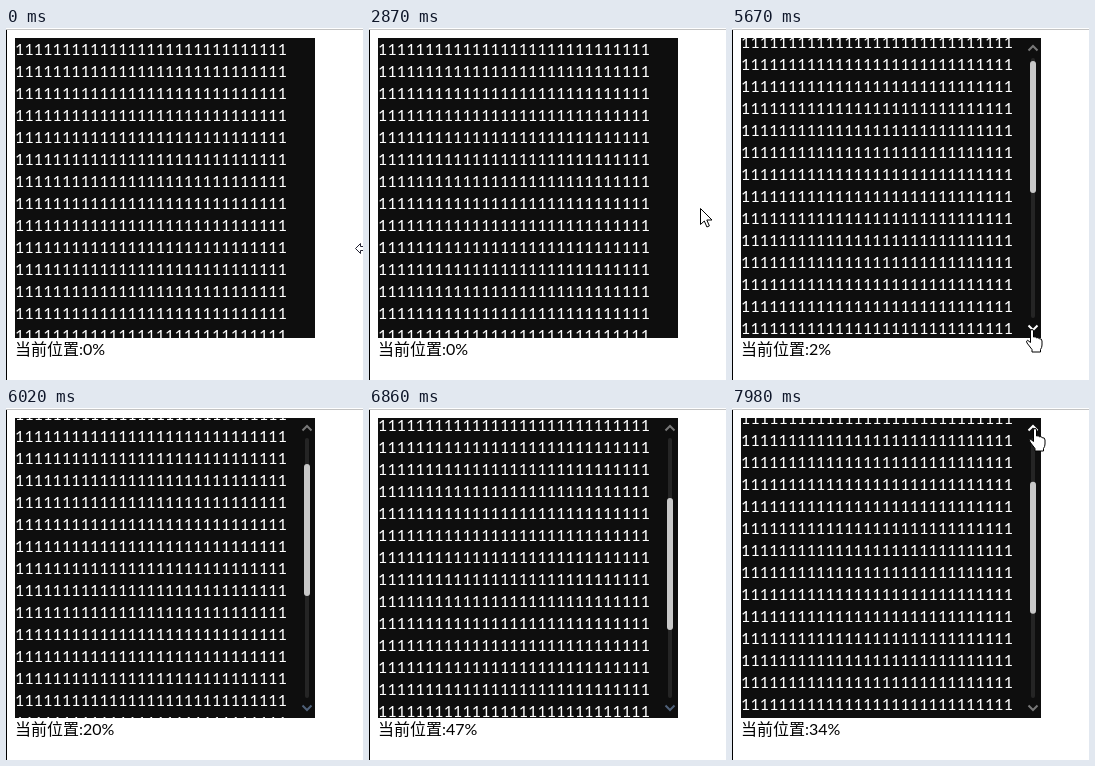
Recreate the animation shown at these times as an HTML page. Size 357 px wide and 352 px high, loop 8 s.

```html
<!DOCTYPE html>
<html lang="zh">
<head>
<meta charset="utf-8">
<title>Scroll position</title>
<style>
@property --scroll { syntax: "<integer>"; inherits: true; initial-value: 0; }
@property --percent { syntax: "<integer>"; inherits: true; initial-value: 0; }

html, body { margin: 0; width: 100%; height: 100%; overflow: hidden; background: #fff; }
body { position: relative; font: 16px/22px Lato, "Noto Sans CJK SC", "Noto Sans CJK", sans-serif; }
body * { animation: 8s linear infinite; }
.edge { position: absolute; background: #000; left: 0; top: 2px; width: 1px; bottom: 0; }
.edge.top { background: #c3c3c3; top: 1px; width: 100%; height: 1px; }

#demo { position: absolute; left: 9px; top: 10px; width: 300px; animation-name: scroll; }
#view { position: relative; height: 300px; overflow: hidden; background: #0e0e0e; color: #fff; }
#rows { white-space: pre; letter-spacing: .1px; transform: translateY(calc(var(--scroll) * -1px)); }
#status { color: #000; }
#status::after {
  --percent: calc(var(--scroll) / 2.9);
  counter-reset: percent var(--percent);
  content: counter(percent) "%";
}

#bar { position: absolute; inset: 0; animation-name: bar; }
#track, #thumb { position: absolute; top: 20px; border-radius: 3px; }
#track { left: 290px; width: 4px; height: 260px; background: #252525; }
#thumb {
  left: 289px; width: 6px; height: 132px; background: #c8c8c8;
  transform: translateY(calc(var(--scroll) * .4414px)); animation-name: thumb;
}
#bar svg { position: absolute; inset: 0; fill: none; stroke-width: 2; }
#up, #down { stroke: #777; animation-timing-function: step-end; }
#up { animation-name: up; }
#down { animation-name: down; }

#pointer { position: absolute; left: 0; top: 0; animation-name: move; }
#pointer svg { display: block; overflow: visible; width: 1px; height: 1px; }
#pointer path { fill: #fff; stroke: #000; visibility: hidden; animation-timing-function: step-end; }
#pointer #resize { stroke: #223; animation-name: resize; }
#pointer #arrow { animation-name: arrow; }
#pointer #beam { fill: none; stroke: #ddd; animation-name: beam; }
#pointer #hand { animation-name: hand; }

@keyframes scroll {
  0%, 69.6% { --scroll: 0; }
  70.8% { --scroll: 6; }
  79.6% { --scroll: 111; }
  85.7% { --scroll: 136; }
  88% { --scroll: 139; }
  93%, 100% { --scroll: 99; }
}
@keyframes bar {
  0%, 20.4% { opacity: 0; }
  22.5%, 33.5% { opacity: 1; }
  35.8%, 40.8% { opacity: 0; }
  43%, 100% { opacity: 1; }
}
@keyframes thumb {
  0%, 58% { background: #c8c8c8; }
  59%, 62% { background: #ddd; }
  63%, 100% { background: #c8c8c8; }
}
@keyframes up { 0% { stroke: #777; } 99.7%, 100% { stroke: #fff; } }
@keyframes down {
  0% { stroke: #777; }
  66% { stroke: #fff; }
  72% { stroke: #4f6078; }
  91%, 100% { stroke: #777; }
}
@keyframes move {
  0%, .8% { transform: translate(349px, 220px); }
  1% { transform: translate(347px, 206px); }
  7% { transform: translate(335px, 195px); }
  8.7%, 12.2% { transform: translate(334px, 194px); }
  14%, 19.2% { transform: translate(331px, 180px); }
  23.6%, 29.7% { transform: translate(262px, 172px); }
  35.8%, 40.2% { transform: translate(331px, 180px); }
  43.7%, 55.1% { transform: translate(234px, 169px); }
  59.4%, 60% { transform: translate(302px, 155px); }
  64.7% { transform: translate(302px, 283px); }
  67.3%, 90% { transform: translate(300px, 301px); }
  91% { transform: translate(310px, 62px); }
  98%, 100% { transform: translate(303px, 20px); }
}
@keyframes resize { 0% { visibility: visible; } .87%, 100% { visibility: hidden; } }
@keyframes arrow {
  0%, 20.6%, 41%, 93.5%, 100% { visibility: hidden; }
  .87%, 33.9%, 91% { visibility: visible; }
}
@keyframes beam {
  0%, 33.9%, 58.6%, 100% { visibility: hidden; }
  20.6%, 41% { visibility: visible; }
}
@keyframes hand {
  0%, 72% { visibility: hidden; }
  58.6%, 93.5%, 100% { visibility: visible; }
}
</style>
</head>
<body>
<div class="edge top"></div>
<div class="edge"></div>

<div id="demo">
  <div id="view">
    <div id="rows"></div>
    <div id="bar">
      <div id="track"></div>
      <div id="thumb"></div>
      <svg width="300" height="300">
        <path id="up" d="M287.5 12.5l4.5-4.5 4.5 4.5"/>
        <path id="down" d="M287.5 287.5l4.5 4.5 4.5-4.5"/>
      </svg>
    </div>
  </div>
  <div id="status">当前位置:</div>
</div>

<div id="pointer">
  <svg>
    <path id="resize" d="M.5.5l5-5v3h10v-3l5 5-5 5v-3h-10v3z"/>
    <path id="arrow" d="M.5.5v16l3.8-3.5 2.6 6 2.5-1.1-2.6-5.9h5.2z"/>
    <path id="beam" d="M-3.5-8.5h3l.5 1 .5-1h3M0-8v16M-3.5 8.5h3l.5-1 .5 1h3"/>
    <path id="hand" d="M-1.5 2a1.5 1.5 0 0 1 3 0v6q2-.8 2.8.7 2-.6 2.8.9 2.9-.2 2.9 2.4v4q0 2.5-1.5 4.5v2.5h-8.5v-2.5l-5-6.5q-1.2-2.4.7-2.7l2.8 2.2z"/>
  </svg>
</div>

<script>
document.getElementById("rows").textContent = Array(27).fill("1".repeat(29)).join("\n");
</script>
</body>
</html>
```
